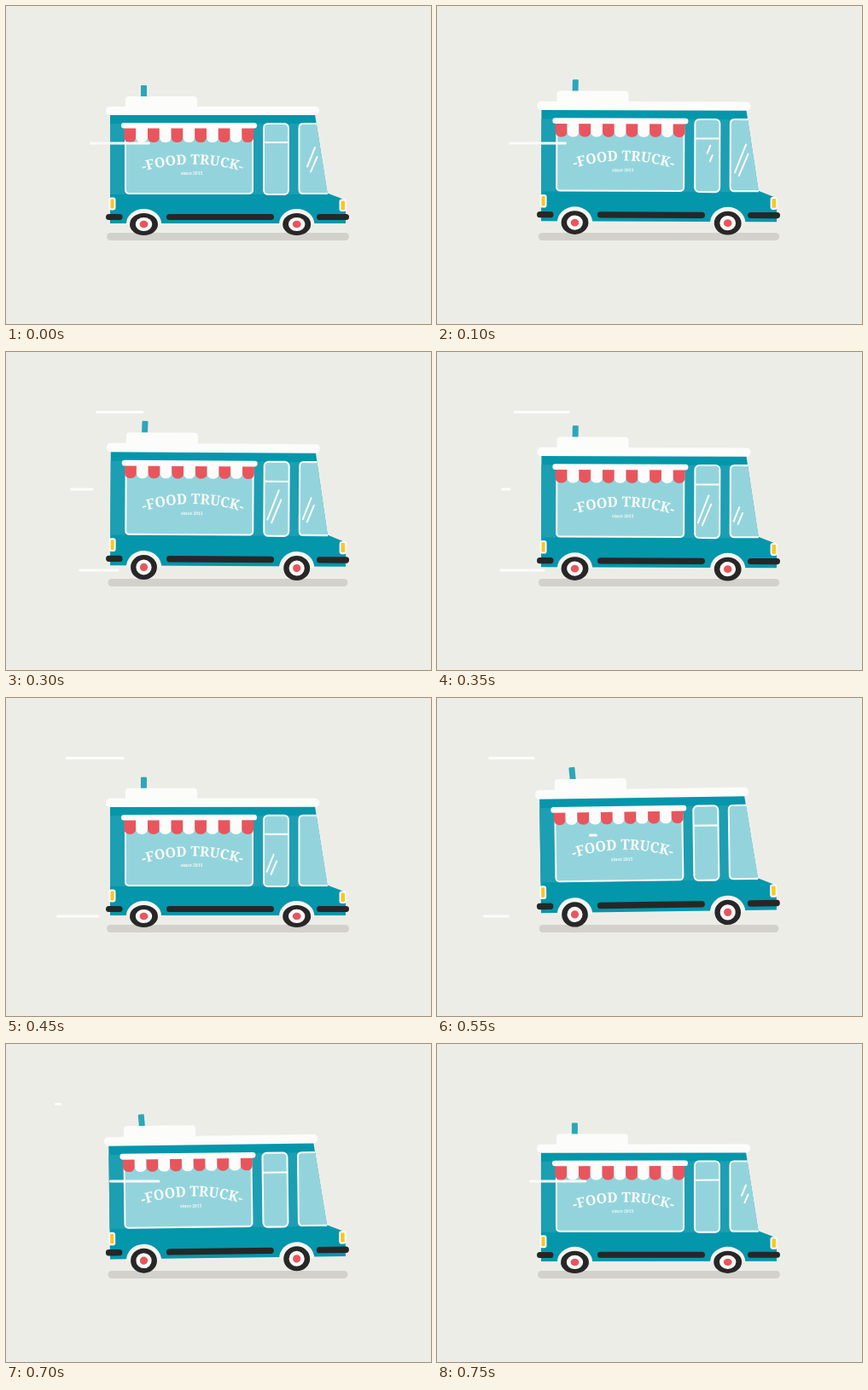
Write an HTML page with a canvas that moves like this. It is 498 px wide and 373 px high and loops after 0.8 s.

```html
<!DOCTYPE html>
<html lang="en">
<head>
<meta charset="utf-8">
<title>Food truck</title>
<style>
  html, body { margin: 0; width: 100%; height: 100%; overflow: hidden; background: #edede8; }
  canvas { display: block; }
</style>
</head>
<body>
<canvas id="stage" width="498" height="373"></canvas>
<script>
const ctx = document.getElementById('stage').getContext('2d');
const LOOP = 800, STEP = 50;
const PIVOT_X = 250, AXLE_Y = 256;
const COLOR = {
  bg: '#edede8', shadow: '#d3d1cb', white: '#fcfcfa', teal: '#0496ab', tealMid: '#1c9fb2',
  pipe: '#2ba7b8', glass: '#93d4dc', red: '#e9555d', black: '#272727', yellow: '#fcc521'
};

const clamp = v => Math.min(1, Math.max(0, v));
const mix = (a, b, u) => a + (b - a) * u;
const ease = (t, from, to) => (1 - Math.cos(Math.PI * clamp((t - from) / (to - from)))) / 2;

// Height of one suspension hop, 0 to 1.
const hop = (t, start, top, fall, land) => ease(t, start, top) * (1 - ease(t, fall, land));

// Leading and trailing ends of a line that shoots out fast and closes up late.
function sweep(t, start, life, power) {
  const u = clamp((t - start + LOOP) % LOOP / life);
  return { head: 1 - (1 - u) ** power, tail: u ** (power - 1) };
}

function box(x, y, w, h, radius, fill, stroke) {
  ctx.beginPath();
  ctx.roundRect(x, y, w, h, radius);
  if (fill) { ctx.fillStyle = fill; ctx.fill(); }
  if (stroke) { ctx.lineWidth = 2; ctx.strokeStyle = stroke; ctx.stroke(); }
}

function line(x1, y1, x2, y2, width, cap = 'round') {
  ctx.lineWidth = width;
  ctx.lineCap = cap;
  ctx.strokeStyle = COLOR.white;
  ctx.beginPath();
  ctx.moveTo(x1, y1);
  ctx.lineTo(x2, y2);
  ctx.stroke();
}

function oval(x, y, rx, ry, fill, from = 0) {
  ctx.fillStyle = fill;
  ctx.beginPath();
  ctx.ellipse(x, y, rx, ry, 0, from, Math.PI * 2);
  ctx.fill();
}

function drawShell() {
  ctx.beginPath();
  ctx.moveTo(122, 122);
  ctx.lineTo(361.2, 122);
  ctx.lineTo(376.5, 219.5);
  ctx.lineTo(391, 225);
  ctx.quadraticCurveTo(398, 227, 398, 231);
  ctx.lineTo(398, 255);
  ctx.lineTo(122, 255);
  ctx.closePath();
  ctx.fillStyle = COLOR.teal;
  ctx.fill();
  ctx.fillStyle = COLOR.tealMid;
  ctx.fillRect(122, 138, 230, 83);
}

// The windscreen is open at the sloping front edge.
function drawWindscreen() {
  ctx.beginPath();
  ctx.moveTo(363.8, 138);
  ctx.lineTo(348, 138);
  ctx.quadraticCurveTo(343.5, 138, 343.5, 143);
  ctx.lineTo(343.5, 215);
  ctx.quadraticCurveTo(343.5, 220, 348, 220);
  ctx.lineTo(376.8, 220);
  ctx.fillStyle = COLOR.glass;
  ctx.fill();
  ctx.lineWidth = 2;
  ctx.lineCap = 'butt';
  ctx.strokeStyle = COLOR.white;
  ctx.stroke();
}

function drawBody() {
  drawShell();
  drawWindscreen();
  box(140, 142, 149, 78, 4, COLOR.glass, COLOR.white);
  box(302, 138, 29, 83, 5, COLOR.glass, COLOR.white);
  line(302, 160, 331, 160, 2, 'butt');

  box(121.5, 225.5, 6, 13, 2, COLOR.yellow, COLOR.white);
  box(391.5, 227.5, 6.5, 12.5, 2, COLOR.yellow, COLOR.white);

  box(117, 244, 19.5, 7, 3.5, COLOR.black);
  box(188, 244, 126, 7, 3.5, COLOR.black);
  box(364, 244, 38, 7, 3.5, COLOR.black);
}

function drawRoof(lean) {
  ctx.save();
  ctx.translate(161.5, 108);
  ctx.rotate(lean);
  box(-3.5, -15, 7, 18, 1, COLOR.pipe);
  ctx.restore();
  box(140, 106, 84, 16, 4, COLOR.white);
  box(117, 118, 250, 10, 4.5, COLOR.white);
}

function drawAwning(lift) {
  const count = 11, width = 13.8, depth = 19 - 3.5 * lift;
  for (let i = 0; i < count; i++) {
    box(138.4 + i * width, 141, width, depth, [0, 0, 6, 6], i % 2 ? COLOR.white : COLOR.red);
  }
  box(135, 137, 159, 6.5, 3.2, COLOR.white);
}

function drawSign() {
  const text = '-FOOD TRUCK-', radius = 200, cx = 218.5, baseline = 185.5;
  ctx.fillStyle = COLOR.white;
  ctx.textAlign = 'center';
  ctx.font = 'bold 16px "Noto Serif", serif';
  let x = -ctx.measureText(text).width / 2;
  for (const letter of text) {
    const w = ctx.measureText(letter).width;
    ctx.save();
    ctx.translate(cx, baseline + radius);
    ctx.rotate((x + w / 2) / radius);
    ctx.fillText(letter, 0, -radius);
    ctx.restore();
    x += w;
  }
  ctx.font = 'bold 5px "Noto Serif", serif';
  ctx.fillText('since 2015', 217.5, 198);
}

function drawGlare(x, y, t, start, life) {
  const { head, tail } = sweep(t, start, life, 5);
  if (head <= tail) return;
  const ray = (x1, y1, x2, y2) => line(
    x + mix(x1, x2, tail), y + mix(y1, y2, tail),
    x + mix(x1, x2, head), y + mix(y1, y2, head), 2);
  ray(0, 0, -14.5, 36);
  ray(2.5, 11, -9.5, 39);
}

function drawWheel(x, lift) {
  const rx = 16.5 - 1.4 * lift, ry = 13 + 2 * lift;
  oval(x, 0, 20.7, ry + 5, '#f5f5f1', Math.PI);
  oval(x, 0, rx, ry, COLOR.black);
  oval(x, 0, rx * .59, ry * .62, COLOR.white);
  oval(x, 0, rx * .3, ry * .32, COLOR.red);
}

function drawStreak(x, y, reach, t, start, life) {
  const { head, tail } = sweep(t, start, life, 3);
  if (head > tail) box(x - reach * head, y - 1.5, reach * (head - tail), 3, 1.5, COLOR.white);
}

function draw(t) {
  const noseDown = hop(t, 0, 225, 225, 450), noseUp = hop(t, 440, 590, 670, 760);
  const lift = Math.max(noseDown, noseUp);
  const tilt = .008 * noseDown - .017 * noseUp;

  ctx.fillStyle = COLOR.bg;
  ctx.fillRect(0, 0, 498, 373);
  box(118 + 2 * lift, 266, 284 - 4 * lift, 9, 4.5, COLOR.shadow);

  ctx.save();
  ctx.translate(PIVOT_X, AXLE_Y - 4 * lift);
  ctx.rotate(tilt);
  ctx.save();
  ctx.translate(0, -1.3 * lift);
  ctx.scale(1, 1 + .063 * lift);
  ctx.translate(-PIVOT_X, -AXLE_Y);
  drawBody();
  drawRoof(tilt * 6);
  drawAwning(lift);
  drawSign();
  drawGlare(362, 166, t, 710, 510);
  drawGlare(320, 168, t, 75, 460);
  ctx.restore();
  drawWheel(161.5 - PIVOT_X, lift);
  drawWheel(340.7 - PIVOT_X, lift);
  ctx.restore();

  drawStreak(188, 161, 113, t, 530, 655);
  drawStreak(168, 70.5, 111, t, 165, 555);
  drawStreak(139, 256, 86, t, 165, 485);
}

const origin = performance.now();
function tick() {
  const t = (performance.now() - origin) % LOOP;
  draw(Math.floor(t / STEP) * STEP);
  requestAnimationFrame(tick);
}
tick();
</script>
</body>
</html>
```
